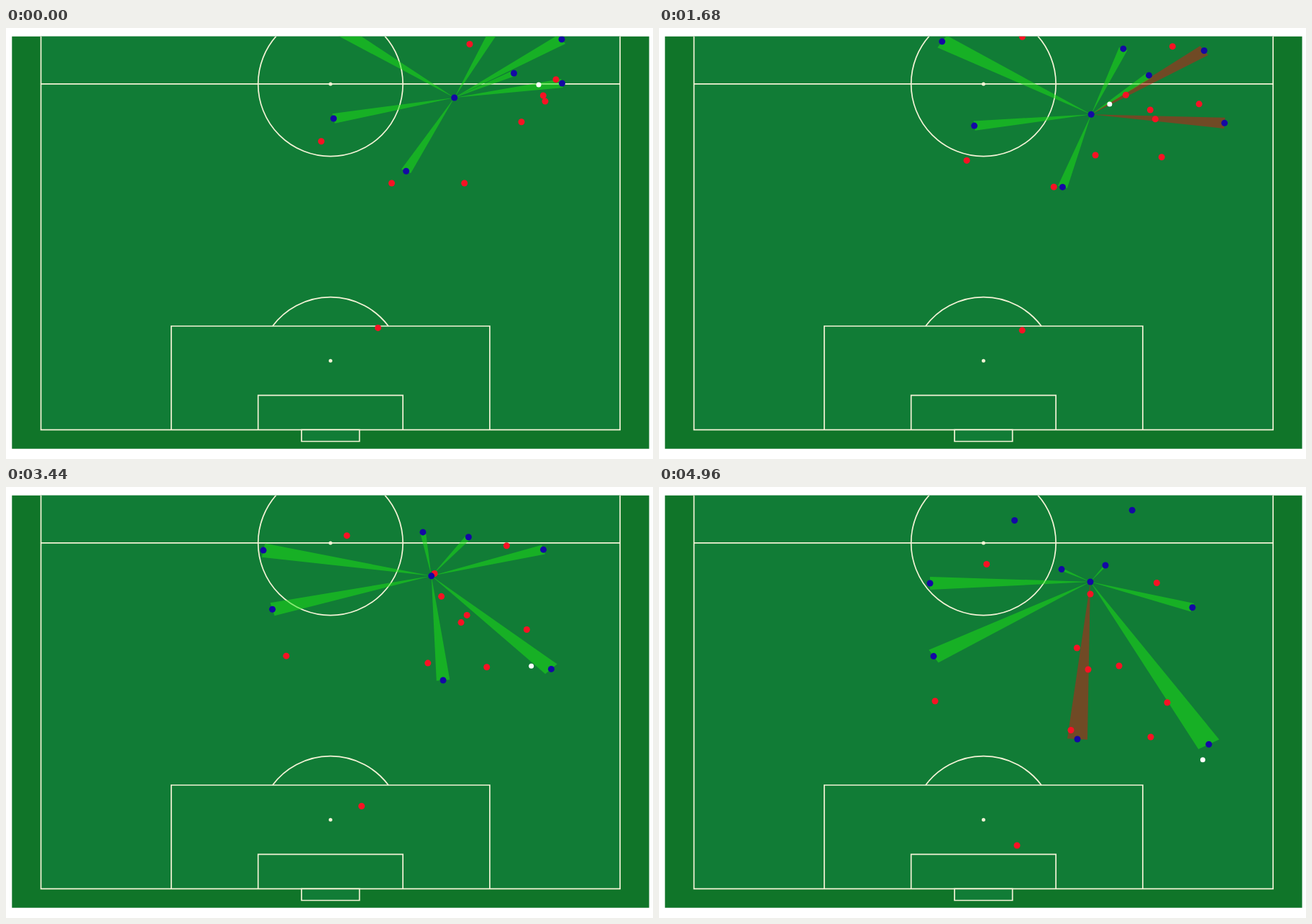
These frames come from a looping animation (900x600 px, 5000 ms). An HTML page:

```html
<!DOCTYPE html>
<html lang="en">
<head>
<meta charset="utf-8">
<title>Passing lanes</title>
<style>
html, body { margin: 0; width: 100%; height: 100%; overflow: hidden; background: #fff; }
svg { display: block; }
#lines * { vector-effect: non-scaling-stroke; }
</style>
</head>
<body>
<svg width="900" height="600" viewBox="0 0 900 600">
  <clipPath id="field"><rect x="8.3" y="11.8" width="886.3" height="574"/></clipPath>
  <g clip-path="url(#field)">
    <rect width="900" height="600" fill="#107529"/>
    <!-- half a pitch in yards: 80 wide, 60 long -->
    <g id="lines" transform="translate(48.6 77.9) scale(10.07 8.026)" fill="none" stroke="#f3f3d6" stroke-width="1.7">
      <rect y="-60" width="80" height="120" fill="#117c36"/>
      <rect x="36" y="60" width="8" height="2" fill="#117c36"/>
      <path d="M0 0H80M18 60V42H62V60M30 60V54H50V60"/>
      <path d="M32 42A10 12.547 0 0 1 48 42"/>
      <ellipse cx="40" cy="0" rx="10" ry="12.547"/>
    </g>
    <g fill="#f3f3d6">
      <circle cx="451.4" cy="77.9" r="2.5"/>
      <circle cx="451.4" cy="463.2" r="2.5"/>
    </g>
    <g id="lanes"></g>
    <g id="dots"></g>
  </g>
</svg>
<script>
const LOOP = 5000, STEP = 40, END = 4960, KICK = 2240;
const GREEN = 'rgba(30,228,20,.5)', RED = 'rgba(207,25,20,.5)';
const WIDE = 0.0638, TALL = 0.0408; // lane spread per pixel of pass length

// A run is start and end; each further point bends it at the next of these times
const KEYS = [0, END, 2960, 1080, KICK];

function add(parent, tag, attrs) {
  const el = document.createElementNS('http://www.w3.org/2000/svg', tag);
  for (const k in attrs) el.setAttribute(k, attrs[k]);
  return document.getElementById(parent).appendChild(el);
}

// The lowest-degree polynomial path through the points
function run(points, times = KEYS) {
  const ts = times.slice(0, points.length);
  return t => {
    let x = 0, y = 0;
    points.forEach(([px, py], i) => {
      const w = ts.reduce((acc, s, j) => j === i ? acc : acc * (t - s) / (ts[i] - s), 1);
      x += w * px;
      y += w * py;
    });
    return [x, y];
  };
}

const dots = [], reds = [], mates = [];
function dot(path, fill, r = 4.5) {
  const p = { path, pos: [0, 0], el: add('dots', 'circle', { r, fill }) };
  dots.push(p);
  return p;
}
const red = (...points) => reds.push(dot(run(points), '#f81224'));
const blue = (...points) => dot(run(points), '#1408a4');
function mate(...points) {
  const p = blue(...points);
  p.lane = add('lanes', 'polygon', {});
  mates.push(p);
}

red([645, 22.5], [600, 149], [604.5, 119.1], [668, 68.5], [627.5, 109.5]);
red([747.3, 94], [597, 254], [645.5, 166], [704, 98.5]);
red([750, 102], [640, 249], [648, 161.3], [717, 115.7], [668, 140]);
red([765, 71.7], [707, 300], [731.8, 169.3], [758.5, 86]);
red([717, 130.7], [684, 348], [674.5, 228], [710, 161.4]);
red([637.7, 216], [581.4, 224], [606.3, 144], [612, 206.4], [606, 154]);
red([536.5, 216], [573, 338.5], [579, 232.5], [538, 221]);
red([438.5, 157.8], [384, 298], [399.4, 219], [437.8, 172.5]);
red([745, -24], [692.4, 133.5], [699.8, 66]);
red([545, -50], [455.7, 107.5], [481.6, 53.5]);
red([517.5, 417.4], [498, 499], [496.5, 434.5], [510, 418.6]);

mate([773, 15.8], [742, 167.7], [750, 68]);
mate([706.5, 63], [621, 109], [653.5, 66], [693, 67]);
mate([773.5, 77], [764.8, 358.2], [765.6, 217.8], [790.5, 102.6]);
mate([455.7, 126], [382, 235.6], [386, 157.3], [457, 131]);
mate([556.6, 199.3], [582, 351], [598.5, 252], [549, 212.2]);
mate([690, -15], [560, 114.6], [596, 52.5], [667, 16.5]);
mate([430, -18], [377, 134], [364, 69], [409.5, 0]);
blue([705, -160], [658.2, 32.2]);
blue([534, -144], [494.6, 46.5]);
const carrier = blue([623.7, 97], [600, 132], [592.5, 123.3], [608, 115.5]);

const ballIn = run([[741, 79], [657.8, 92.6], [607.8, 122.2]], [0, 1080, KICK]);
const ballOut = run([[607.8, 122.2], [683.8, 194.2], [730.7, 249.2], [755.5, 347.5], [756.4, 379.8]],
  [KICK, 2960, 3440, 4440, END]);
dot(t => t < KICK ? ballIn(t) : ballOut(t), '#fff', 3.5);

const side = (a, b, p) => (b[0] - a[0]) * (p[1] - a[1]) - (b[1] - a[1]) * (p[0] - a[0]);
function inside(a, b, c, p) {
  const s = [side(a, b, p), side(b, c, p), side(c, a, p)];
  return s.every(v => v > 0) || s.every(v => v < 0);
}

// A lane turns red while an opponent stands in it
function drawLane(m) {
  const a = carrier.pos, [x, y] = m.pos;
  const ox = (a[1] - y) * WIDE, oy = (x - a[0]) * TALL;
  const b = [x + ox, y + oy], c = [x - ox, y - oy];
  const blocked = reds.some(r => inside(a, b, c, r.pos));
  m.lane.setAttribute('points', [a, b, c].join(' '));
  m.lane.setAttribute('fill', blocked ? RED : GREEN);
}

function draw(t) {
  for (const p of dots) {
    p.pos = p.path(t);
    p.el.setAttribute('cx', p.pos[0]);
    p.el.setAttribute('cy', p.pos[1]);
  }
  mates.forEach(drawLane);
}

function tick() {
  draw(Math.floor(performance.now() % LOOP / STEP) * STEP);
  requestAnimationFrame(tick);
}
tick();
</script>
</body>
</html>
```
